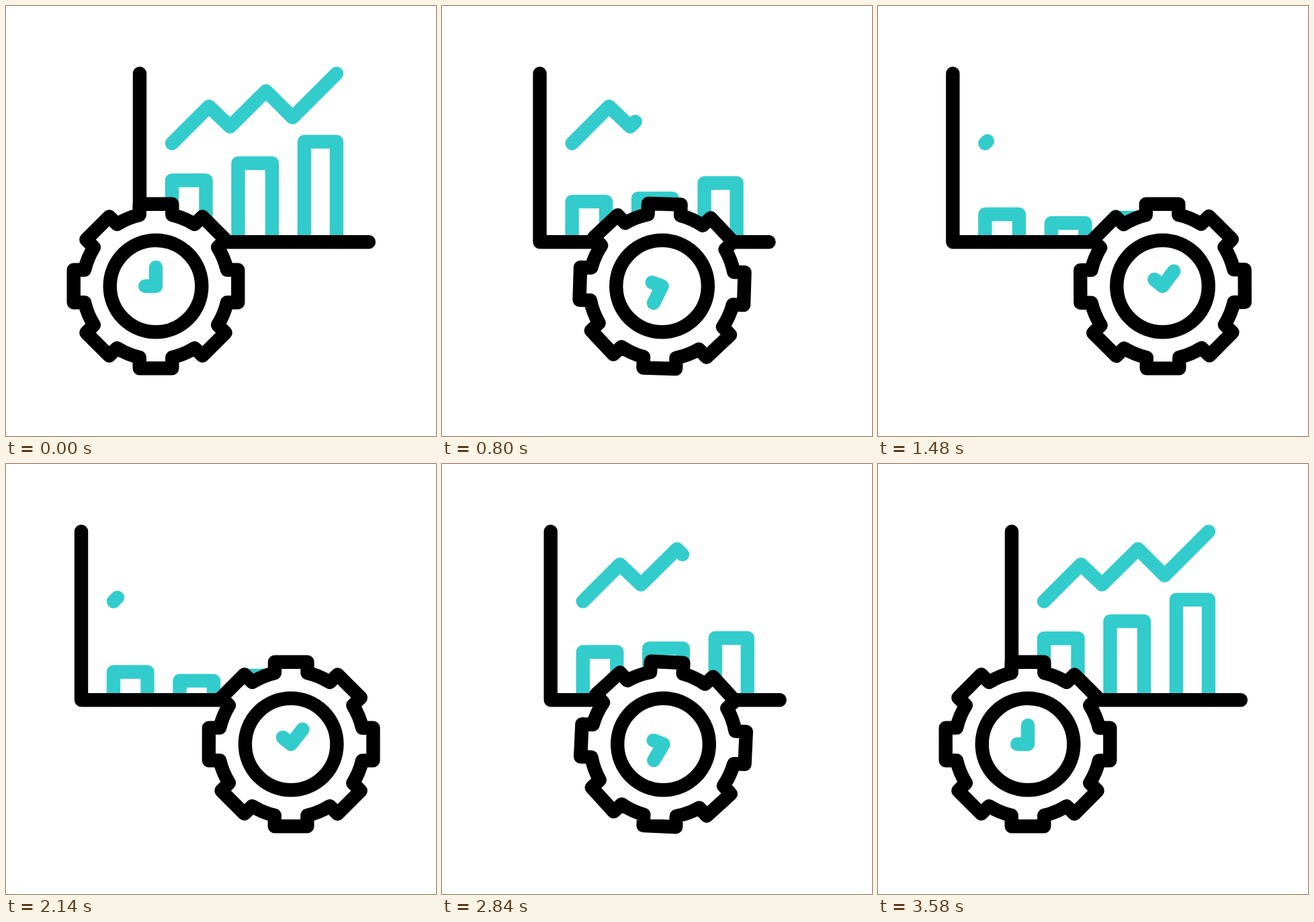
An HTML page that plays this animation: 640 px wide and 640 px high, repeating every 3600 ms.

```html
<!DOCTYPE html>
<html lang="en">
<head>
<meta charset="utf-8">
<title>Growth chart and gear</title>
<style>
  html, body { margin: 0; width: 100%; height: 100%; overflow: hidden; background: #fff; }
  svg { display: block; width: 100%; height: 100%; }
  path, circle { fill: none; stroke: #000; stroke-width: 20.4; stroke-linecap: round; stroke-linejoin: round; }
  .accent { stroke: #33cccc; }
  #teeth { fill: #fff; }
</style>
</head>
<body>
<svg viewBox="0 0 640 640">
  <g id="chart">
    <path id="trend" class="accent" pathLength="1" d="M247 204.5L302 149.5L333.5 179.5L387 126.5L426.5 166L492 100.5"/>
    <path id="bar1" class="accent"/>
    <path id="bar2" class="accent"/>
    <path id="bar3" class="accent"/>
    <path d="M199 100.5V351.2H540"/>
  </g>
  <g id="gear">
    <g id="wheel"><path id="teeth"/></g>
    <circle r="68.3"/>
    <path class="accent" id="hands"/>
  </g>
</svg>
<script>
const LOOP = 3600, HALF = 1785;
const $ = id => document.getElementById(id);

// cubic-bezier(.67, 0, .13, 1)
function ease(x) {
  let lo = 0, hi = 1;
  for (let i = 0; i < 30; i++) {
    const u = (lo + hi) / 2, v = 1 - u;
    if (2.01 * u * v * v + 0.39 * u * u * v + u * u * u < x) lo = u; else hi = u;
  }
  return lo * lo * (3 - 2 * lo);
}

// Goes 0 -> 1 -> 0, beginning at `start`
const swing = (t, start) => ease(Math.max(0, 1 - Math.abs(t - start - HALF) / HALF));

const polar = (deg, r) => {
  const a = deg * Math.PI / 180;
  return [r * Math.sin(a), -r * Math.cos(a)];
};

function gearPath(count) {
  let d = '';
  for (let i = 0; i < count; i++) {
    const a = i * 2 * Math.PI / count, c = Math.cos(a), s = Math.sin(a);
    const [p, q, r, w] = [[-24.3, -106], [-24.3, -122.3], [24.3, -122.3], [24.3, -106]]
      .map(([x, y]) => `${x * c - y * s} ${x * s + y * c}`);
    d += `${i ? 'A108.8 108.8 0 0 1 ' : 'M'}${p}L${q}L${r}L${w}`;
  }
  return d + 'A108.8 108.8 0 0 1 -24.3 -106Z';
}
$('teeth').setAttribute('d', gearPath(8));

const bars = [
  { id: 'bar1', left: 247, right: 297.5, top: 259.5, drop: 51.2, start: -12 },
  { id: 'bar2', left: 345.5, right: 396, top: 234, drop: 90.5, start: 8 },
  { id: 'bar3', left: 444, right: 492, top: 202, drop: 115, start: 28 }
];

function draw(t) {
  $('chart').setAttribute('transform', `translate(${-89 * swing(t, -3)} 0)`);
  $('trend').setAttribute('stroke-dasharray', `${1 - swing(t, -12)} 2`);
  for (const b of bars) {
    const y = b.top + b.drop * swing(t, b.start);
    $(b.id).setAttribute('d', `M${b.left} 351V${y}H${b.right}V351`);
  }
  const k = swing(t, 38);
  $('gear').setAttribute('transform', `translate(${223 + 204.7 * k} 417)`);
  $('wheel').setAttribute('transform', `rotate(${91.6 * k})`);
  $('hands').setAttribute('d', `M${polar(405 * k, 28)}L0 0L${polar(270 + 40 * k, 15.8)}`);
}

function tick() {
  draw(performance.now() % LOOP);
  requestAnimationFrame(tick);
}
tick();
</script>
</body>
</html>
```
